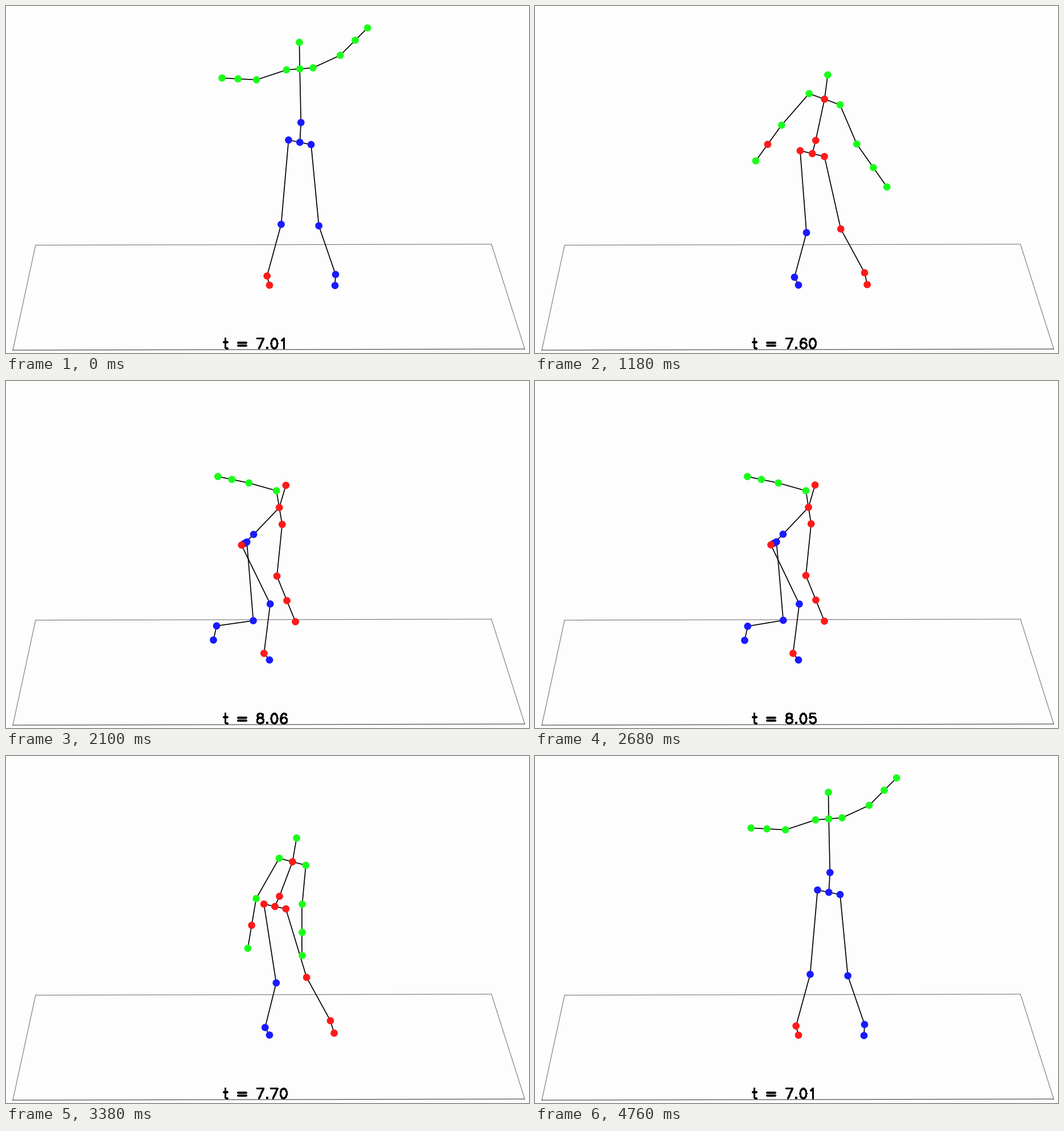
These frames come from a looping animation (919x609 px, 4.78 s). A matplotlib script:

```python
import numpy as np
import matplotlib.pyplot as plt
from matplotlib.animation import FuncAnimation
from matplotlib.collections import LineCollection

W, H, DPI = 919, 609, 64
LAST = 119                      # the motion plays to this step, then back
PX = 72 / DPI

# steps of the key poses, by how many poses a path needs
KEYS = {2: [0, 104], 3: [0, 69, 104], 4: [0, 41, 76, 104],
        5: [0, 41, 69, 76, 104]}

COLORS = {"r": "#ff1a1a", "g": "#1aff1a", "b": "#1a1aff"}

# colour of each joint near each of the five key poses, in drawing order
STATES = {
    "head": "ggggr", "neck": "ggrrr", "waist": "bgrrb",
    "shoulder_r": "gggrr", "elbow_r": "gggrr", "wrist_r": "ggrrr",
    "hand_r": "ggggr",
    "shoulder_l": "ggggg", "elbow_l": "ggggg", "wrist_l": "ggggg",
    "hand_l": "ggggg",
    "pelvis": "brrbb", "hip_l": "bbrrb", "hip_r": "bbrrr",
    "knee_r": "brbbb", "knee_l": "brrrb", "ankle_r": "rbbbr",
    "ankle_l": "brrbb", "toe_r": "rbbbb", "toe_l": "brrrb",
}
CHAINS = [["head", "neck", "waist", "pelvis"]]
for side in "rl":
    CHAINS.append(["neck"] + [f"{part}_{side}" for part in
                              ("shoulder", "elbow", "wrist", "hand")])
    CHAINS.append(["pelvis"] + [f"{part}_{side}" for part in
                                ("hip", "knee", "ankle", "toe")])
BONES = [pair for chain in CHAINS for pair in zip(chain, chain[1:])]


def path(*poses, coast=0.6):
    """Smooth curve through the poses: starts at rest, then coasts to a stop."""
    v = np.array(poses, float).reshape(len(poses), -1)
    keys = np.array(KEYS[len(v)] + [LAST])
    h = np.diff(keys)[:, None]
    d = np.diff(v, axis=0) / h[:-1]
    inner = (d[:-1] * h[1:-1] + d[1:] * h[:-2]) / (h[:-2] + h[1:-1])
    rest = np.zeros_like(v[:1])
    m = np.vstack([rest, inner, coast * d[-1:], rest])
    v = np.vstack([v, v[-1:] + m[-2] * h[-1] / 2])

    k = np.arange(LAST + 1)
    i = np.clip(np.searchsorted(keys, k, side="right") - 1, 0, len(h) - 1)
    s = (k - keys[i])[:, None] / h[i]
    ease = s * s * (3 - 2 * s)
    return (v[i] + (v[i + 1] - v[i]) * ease
            + h[i] * s * (1 - s) * (m[i] * (1 - s) - m[i + 1] * s))


def swing(angles, lengths):
    """Limb segment that turns through the angles (degrees)."""
    a = np.radians(path(*angles, coast=0))
    return path(*lengths, coast=0) * np.hstack([np.cos(a), np.sin(a)])


def build_joints():
    j = {}
    j["neck"] = path((516.2, 110.3), (515.8, 128.1), (499.4, 197.5),
                     (480.6, 221.6))
    j["pelvis"] = path((516.3, 239.2), (508.2, 251.2), (462.2, 267.8),
                       (419.4, 284.9))
    j["head"] = j["neck"] + path((-0.7, -46.6), (11.5, -39))
    j["waist"] = j["pelvis"] + path((2, -34.7), (3.2, -32.2), (9.5, -15.5),
                                    (16.5, -16))

    # shoulders and hips sit evenly about the spine
    shoulder = path((23.3, -1.8), (26, 3.5), (23.4, 6.2), (17, -2.8),
                    (-4.6, -29))
    hip = path((19.8, 4), (19.3, 4.2), (4.9, -2.6))
    for side, sign in (("r", -1), ("l", 1)):
        j["shoulder_" + side] = j["neck"] + sign * shoulder
        j["hip_" + side] = j["pelvis"] + sign * hip

    # standing leg, then the leg that kicks back
    j["knee_r"] = path((483.5, 383.2), (474.8, 398.2), (464.4, 391.4))
    j["ankle_r"] = path((458.7, 473.8), (453.4, 478))
    j["toe_r"] = path((463, 490), (463, 489.6))
    j["knee_l"] = path((549.7, 385.7), (545.3, 397.3), (517, 390),
                       (436.2, 420))
    j["ankle_l"] = path((579.1, 471.2), (578.3, 471.4), (550.3, 460.3),
                        (373.7, 430.4))
    j["toe_l"] = j["ankle_l"] + path((-1, 19.4), (0, 19.2), (6.5, 22.5),
                                     (-5.3, 24.8))

    # each arm: upper part, forearm, and a hand that follows the forearm
    arms = {
        "r": (swing((161.7, 149.2, 113.2, 95.8), (55.6, 60.4, 85.6, 91.2)),
              swing((183, 168.5, 86.3, 67.9), (32.6, 31.7, 49.9, 46.5)),
              0.86),
        "l": (swing((-24.7, 34.3, 95.3, 123.2, 195.7),
                    (52.5, 58.5, 68.5, 49.8, 50.3)),
              swing((-45, 5, 90, 117.7, 191.7),
                    (37.4, 29.2, 49.5, 34.9, 30.5)),
              0.82),
    }
    for side, (upper, fore, ratio) in arms.items():
        j["elbow_" + side] = j["shoulder_" + side] + upper
        j["wrist_" + side] = j["elbow_" + side] + fore
        j["hand_" + side] = j["wrist_" + side] + ratio * fore
    return j


def arc(cx, cy, rx, ry, start, end):
    a = np.radians(np.linspace(start, end, 25))
    return list(zip(cx + rx * np.cos(a), cy + ry * np.sin(a)))


SIX = arc(11, 10.5, 7, 10.5, 45, 180) + arc(10.5, 6.5, 6.5, 6.5, 180, -180)

# plotter-style letters: advance width, then strokes
GLYPHS = {
    " ": (16,),
    "t": (12, [(5, 21), (5, 3)] + arc(8, 3, 3, 3, 180, 270) + [(10, 0)],
          [(2, 14), (9, 14)]),
    "=": (26, [(4, 12), (22, 12)], [(4, 6), (22, 6)]),
    ".": (10, arc(5, 1, 0.8, 0.8, 0, 360)),
    "0": (20, arc(10, 10.5, 6.7, 10.5, 0, 360)),
    "1": (20, [(6, 17), (8, 18), (11, 21), (11, 0)]),
    "2": (20, arc(10, 15.3, 6, 5.7, 170, -40) + [(3, 0), (17, 0)]),
    "3": (20, [(5, 21), (16, 21), (10, 13)]
          + arc(10.5, 6.5, 6.5, 6.5, 90, -155)),
    "4": (20, [(13, 0), (13, 21), (3, 7), (18, 7)]),
    "5": (20, [(15, 21), (5, 21), (4, 12)]
          + arc(10.3, 7, 6.7, 7, 140, -155)),
    "6": (20, SIX),
    "7": (20, [(3, 21), (17, 21), (7, 0)]),
    "8": (20, arc(10, 16.5, 6, 4.5, -90, 270), arc(10, 6, 7, 6, 90, -270)),
    "9": (20, [(20 - x, 21 - y) for x, y in SIX]),
}


def text_strokes(text, x, y, scale):
    strokes = []
    for ch in text:
        width, *lines = GLYPHS[ch]
        strokes += [np.array(ln) * [scale, -scale] + [x, y] for ln in lines]
        x += width * scale
    return strokes


JOINTS = build_joints()

fig = plt.figure(figsize=(W / DPI, H / DPI), dpi=DPI, facecolor="#fdfdfd")
ax = fig.add_axes([0, 0, 1, 1])
ax.set_xlim(0, W)
ax.set_ylim(H, 0)
ax.axis("off")

ax.plot([12, 52, 853, 911.5], [604, 419.7, 418, 602], color="#808080",
        lw=1.2 * PX, zorder=1)
ax.plot([12, 911.5], [604, 602], color="#4a4a4a", lw=1.2 * PX, zorder=1)

bones = LineCollection([], colors="black", linewidths=1.7 * PX, zorder=2,
                       capstyle="round")
label = LineCollection([], colors="black", linewidths=2.2 * PX, zorder=3,
                       capstyle="round", joinstyle="round",
                       antialiaseds=False)
ax.add_collection(bones)
ax.add_collection(label)
dots = ax.scatter(np.zeros(len(STATES)), np.zeros(len(STATES)),
                  s=(12.7 * PX) ** 2, linewidths=0, zorder=4)


def update(frame):
    k = LAST - abs(frame - LAST)
    bones.set_segments([[JOINTS[a][k], JOINTS[b][k]] for a, b in BONES])
    dots.set_offsets([JOINTS[name][k] for name in STATES])
    phase = np.argmin(np.abs(np.array(KEYS[5]) - k))
    dots.set_facecolors([COLORS[s[phase]] for s in STATES.values()])
    label.set_segments(text_strokes(f"t = {7.01 + k / 100:.2f}",
                                    381.3, 601, 0.82))
    return bones, label, dots


anim = FuncAnimation(fig, update, frames=2 * LAST + 1, interval=20,
                     repeat=True, repeat_delay=0, blit=False)
plt.show()
```
